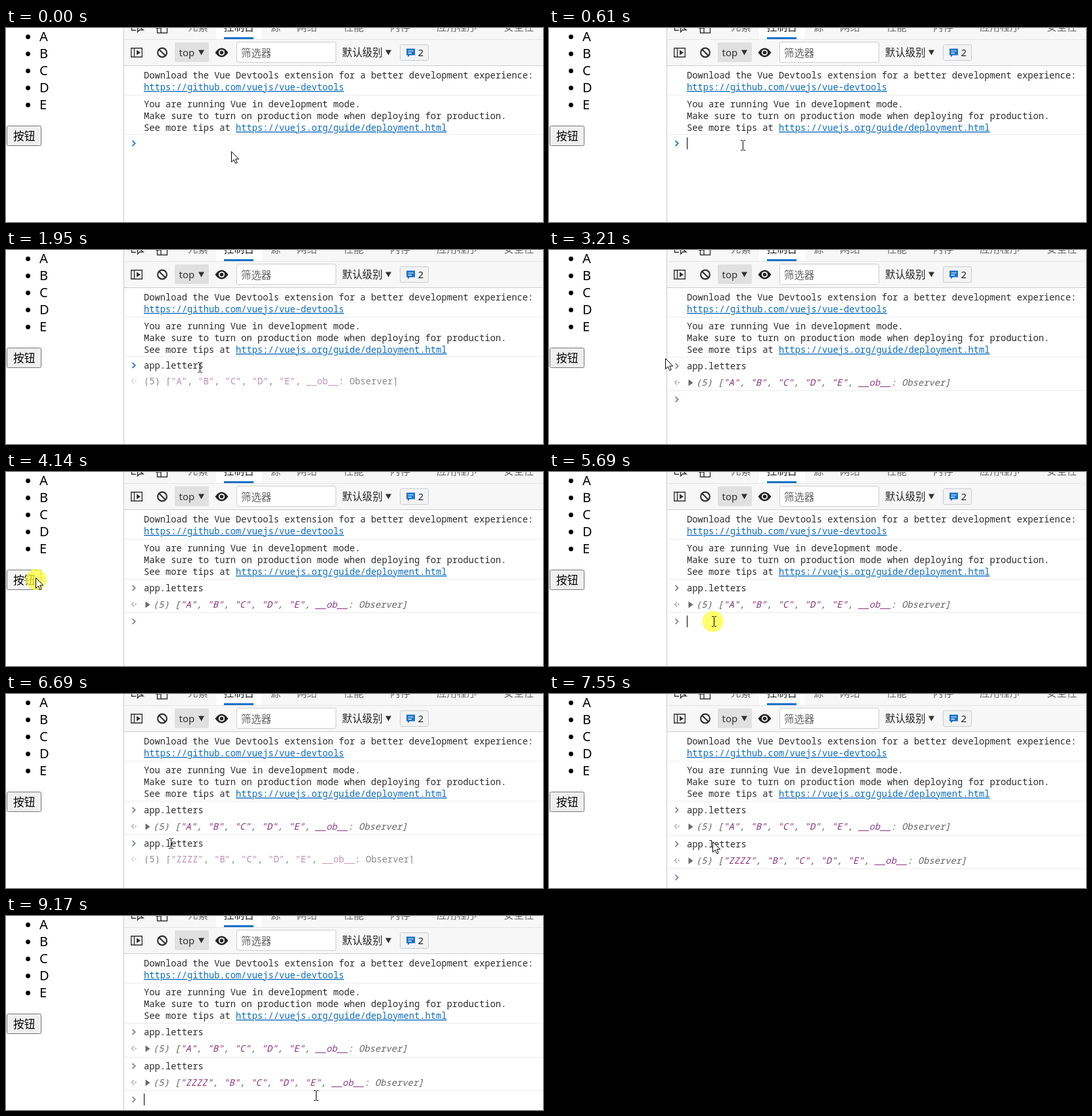
An HTML page for the animation above (9.3 s loop, 818 by 296 pixels).

```html
<!DOCTYPE html>
<html lang="zh">
<head>
<meta charset="utf-8">
<title>Console</title>
<style>
html, body { margin: 0; width: 100%; height: 100%; overflow: hidden; background: #fff; }
svg { display: block; width: 818px; height: 296px; }
text { white-space: pre; }
.ui { font-family: "Noto Sans", "Noto Sans CJK SC", "Noto Sans CJK", sans-serif; font-size: 15.4px; }
.cjk { font-family: "Noto Sans CJK SC", "Noto Sans CJK", sans-serif; font-size: 15.4px; }
.list { font-size: 20px; }
.mono { font-family: "Noto Sans Mono", monospace; font-size: 13.745px; fill: #2b2b2b; }
.link { fill: #0f6cbd; text-decoration: underline; }
.result { font-style: italic; fill: #636363; }
.str { fill: #8b2f74; }
.key { fill: #8f3f85; }
.eager { opacity: .55; }
.line { fill: none; stroke: #333; stroke-width: 1.4; }
</style>
</head>
<body>
<svg id="stage" viewBox="0 0 818 296" xmlns="http://www.w3.org/2000/svg"></svg>
<script>
const LOOP = 9300, ROW = 52;
const stage = document.getElementById('stage');

function add(tag, attrs, parent = stage, text) {
  const el = document.createElementNS('http://www.w3.org/2000/svg', tag);
  for (const k in attrs) el.setAttribute(k, attrs[k]);
  if (text !== undefined) el.textContent = text;
  parent.appendChild(el);
  return el;
}
const rect = (x, y, width, height, fill, more = {}, parent) =>
  add('rect', { x, y, width, height, fill, ...more }, parent);
const label = (x, y, cls, text, parent, more = {}) =>
  add('text', { x, y, class: cls, ...more }, parent, text);
const path = (d, more = {}, parent) => add('path', { d, ...more }, parent);
const group = (more = {}) => add('g', more);
const show = (el, on) => el.setAttribute('visibility', on ? 'visible' : 'hidden');
const within = (t, spans) => spans.some(([a, b]) => t >= a && t < b);

// Page on the left
[...'ABCDE'].forEach((c, i) => {
  add('circle', { cx: 33.5, cy: 13.5 + 26 * i, r: 3.4 });
  label(51, 20 + 26 * i, 'ui list', c);
});
const button = rect(1.5, 149.5, 52, 30, '#efefef', { rx: 2, stroke: '#767676' });
label(11, 171, 'cjk', '按钮', stage, { style: 'font-size:16.7px' });

// Toolbars
rect(179, 0, 1, 296, '#cacaca');
rect(180, 0, 638, 57, '#f7f7f7');
rect(320, 0, 70, 17, '#fff');
rect(180, 17, 638, 1, '#e4e4e4');
rect(332, 14, 45, 3, '#1a73c9');
rect(180, 57, 638, 1, '#cccccc');
[[277, '元素'], [332, '控制台'], [403, '源'], [443, '网络'], [514, '性能'],
 [585, '内存'], [656, '应用程序'], [758, '安全性']].forEach(([x, s]) =>
  label(x, 4, 'cjk', s, stage, { fill: s === '控制台' ? '#111' : '#666' }));
path('M191.500-3V3.500H198M200.500-4V6L203.500 3H209Z', { class: 'line' });
path('M230.500-4V7.500H245.500V-4M228 0H236V7', { class: 'line' });

path('M190.700 30.700H207.300V44.300H190.700ZM195.500 31V44', { class: 'line' });
path('M199 33.500L205 37.500L199 41.500Z', { fill: '#333' });
add('circle', { cx: 238, cy: 37.5, r: 6.9, class: 'line', style: 'stroke-width:2.2' });
path('M233.200 32.700L242.800 42.300', { class: 'line', style: 'stroke-width:2.2' });
rect(257, 22, 52, 30, '#e0e0e0', { rx: 2 });
label(263.5, 43, 'ui', 'top', stage, { fill: '#333', style: 'font-size:15px' });
const down = x => path(`M${x} 33.500h9l-4.500 8Z`, { fill: '#333' });
down(293);
path('M318.500 37.500Q328.500 23.500 338.500 37.500Q328.500 51.500 318.500 37.500Z', { fill: '#222' });
add('circle', { cx: 328.5, cy: 37.5, r: 4.6, fill: '#f7f7f7' });
add('circle', { cx: 328.5, cy: 37.5, r: 2.8, fill: '#222' });
rect(351.5, 21.5, 151, 31, '#fff', { rx: 2.5, stroke: '#cecece' });
label(358, 43.5, 'cjk', '筛选器', stage, { fill: '#666' });
label(512, 43, 'cjk', '默认级别', stage, { fill: '#222' });
down(578);
rect(600.5, 25.5, 43, 24, '#f3f3f3', { rx: 2, stroke: '#c8ccd2' });
path('M610 31.500H623V41.500H615L612 44.500V41.500H610Z', { fill: '#1a73c9' });
path('M612.500 35H620.500M612.500 38.300H618', { stroke: '#fff', 'stroke-width': 1.2 });
label(627.5, 43, 'ui', '2', stage, { fill: '#222', style: 'font-size:15px' });

// Fixed console messages
label(210, 77, 'mono', 'Download the Vue Devtools extension for a better development experience:');
label(210, 95, 'mono link', 'https://github.com/vuejs/vue-devtools');
rect(180, 102, 638, 1, '#ececec');
label(210, 121, 'mono', 'You are running Vue in development mode.');
label(210, 139, 'mono', 'Make sure to turn on production mode when deploying for production.');
const tips = label(210, 157, 'mono', 'See more tips at ');
add('tspan', { class: 'link' }, tips, 'https://vuejs.org/guide/deployment.html');

// Console entries
const chevron = (y, stroke, parent) =>
  path(`M192.500 ${y - 4}l4.200 4l-4.200 4`, { fill: 'none', stroke, 'stroke-width': 1.8 }, parent);

function backArrow(y, parent) {
  path(`M195 ${y - 3.500}l-3.500 3.500l3.500 3.500`, { fill: 'none', stroke: '#a8a8a8', 'stroke-width': 1.3 }, parent);
  add('circle', { cx: 197.5, cy: y, r: 1.2, fill: '#a8a8a8' }, parent);
}

function arrayText(x, y, cls, first, parent) {
  const line = label(x, y, 'mono ' + cls, '', parent);
  const span = (s, c) => add('tspan', { class: c }, line, s);
  span('(5) [', '');
  for (const s of [first, 'B', 'C', 'D', 'E']) {
    span(`"${s}"`, 'str');
    span(', ', '');
  }
  span('__ob__', 'key');
  span(': Observer]', '');
}

const defs = add('defs', {});
const clip = add('clipPath', { id: 'cut' }, defs);
rect(180, 187, 638, 20, '#000', {}, clip);

const entries = [
  { typed: 1350, eager: 1420, done: 2420, first: 'A' },
  { typed: 6090, eager: 6160, done: 7020, first: 'ZZZZ' }
].map((e, i) => {
  const at = { transform: `translate(0 ${ROW * i})` };
  const typed = group(at), preview = group(at), done = group(at);
  label(210, 181, 'mono', 'app.letters', typed);
  const cut = add('g', { 'clip-path': 'url(#cut)', class: 'eager' }, preview);
  backArrow(200, cut);
  arrayText(210, 205, '', e.first, cut);
  rect(180, 163, 638, 1, '#ececec', {}, done);
  chevron(177, '#8a8a8a', done);
  label(210, 182, 'mono', 'app.letters', done);
  backArrow(202, done);
  path('M212.500 197.500L219.500 202.500L212.500 207.500Z', { fill: '#6a6a6a' }, done);
  arrayText(224, 207, 'result', e.first, done);
  return { ...e, groups: [typed, preview, done] };
});

const prompt = group();
rect(180, 162, 638, 1, '#ececec', {}, prompt);
const promptMark = chevron(176, '#2a7ac8', prompt);
const caret = rect(210, 167, 1, 18, '#000', {}, prompt);

// Pointer
const pointer = group();
const glow = add('circle', { cx: -.5, cy: 1, r: 16, fill: '#ffff3c', opacity: .75 }, pointer);
const arrow = path('M.5.500V16.500L4.200 13L6.800 18.700L9.200 17.600L6.700 12H11.700Z',
  { fill: '#fff', stroke: '#000', 'stroke-width': 1, transform: 'translate(-1 -2)' }, pointer);
const beam = path('M-2-6.500H.500L1.500-5.500L2.500-6.500H5M1.500-5.500V7.500M-2 8.500H.500L1.500 7.500L2.500 8.500H5',
  { fill: 'none', stroke: '#000', 'stroke-width': 1 }, pointer);

const route = [
  [40, 344, 190], [430, 294, 178], [2920, 294, 178], [3210, 178, 167], [3410, 72, 124],
  [3710, 46, 163], [4470, 46, 163], [4780, 150, 240], [5010, 282, 278], [5140, 261, 244],
  [5270, 261, 244], [5480, 250, 227], [7850, 250, 227], [8080, 471, 274],
  [8299, 471, 274], [8300, 471, 273]
];
const beamTimes = [[300, 2990], [5400, 7090], [8010, LOOP]];
const glowTimes = [[470, 610], [4080, 4300], [5570, 5760]];
const caretTimes = [[540, 1070], [1350, 1950], [2420, 2950], [3480, 4010], [5690, 6690],
  [7020, 7550], [8080, 8640], [9170, LOOP]];

function place(t) {
  const i = route.findIndex(p => p[0] > t);
  if (i === 0) return route[0].slice(1);
  if (i < 0) return route[route.length - 1].slice(1);
  const [a, b] = [route[i - 1], route[i]];
  const k = (t - a[0]) / (b[0] - a[0]);
  return [1, 2].map(n => Math.round(a[n] + (b[n] - a[n]) * k));
}

function draw(t) {
  const row = entries.filter(e => t >= e.done).length;
  let typing = false;
  for (const { typed, eager, done, groups } of entries) {
    const open = t >= typed && t < done;
    typing = typing || open;
    show(groups[0], open);
    show(groups[1], open && t >= eager);
    show(groups[2], t >= done);
  }
  prompt.setAttribute('transform', `translate(0 ${ROW * row})`);
  promptMark.setAttribute('stroke', row ? '#7f86ad' : '#2a7ac8');
  caret.setAttribute('x', typing ? 300 : 210);
  show(caret, within(t, caretTimes));

  // The pointer is sampled at about 15 steps a second
  const step = 200 / 3;
  const [x, y] = place(Math.floor((t - 10) / step + 1e-6) * step + 10.01);
  pointer.setAttribute('transform', `translate(${x} ${y})`);
  const isBeam = within(t, beamTimes), isDown = within(t, glowTimes);
  show(beam, isBeam);
  show(arrow, !isBeam);
  show(glow, isDown);
  const over = x > 0 && x < 54 && y > 148 && y < 180;
  button.setAttribute('fill', over ? (isDown ? '#f5f5f5' : '#e5e5e5') : '#efefef');
  button.setAttribute('stroke', over && !isDown ? '#4f4f4f' : '#767676');
}

const start = performance.now();
function tick() {
  draw((performance.now() - start) % LOOP);
  requestAnimationFrame(tick);
}
draw(0);
requestAnimationFrame(tick);
</script>
</body>
</html>
```
